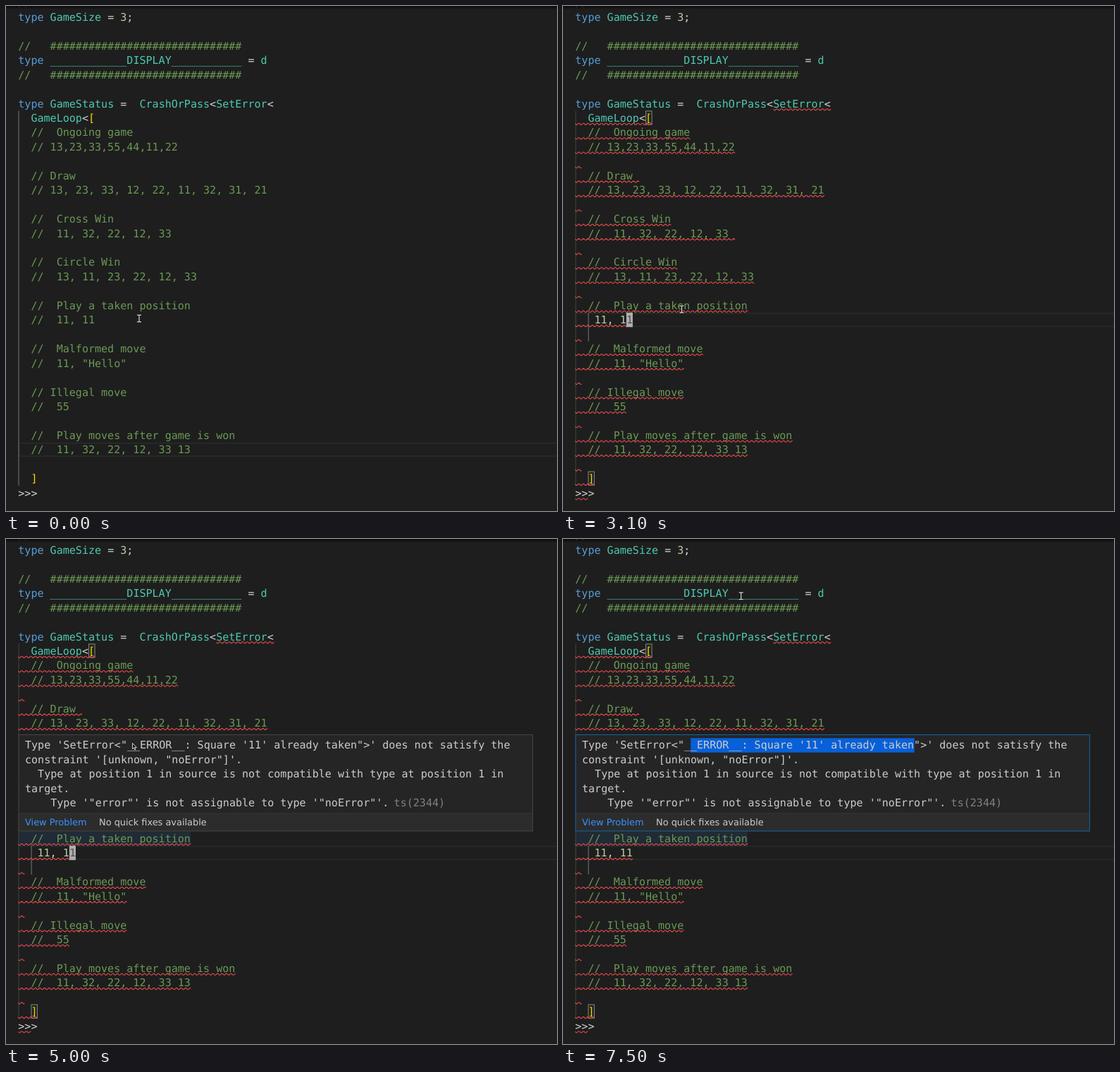
Write an HTML page that moves like this. It is 782 px wide and 716 px high and loops after 8 s.

```html
<!DOCTYPE html>
<html lang="en">
<head>
<meta charset="utf-8">
<title>Type checked game</title>
<style>
html, body { margin: 0; width: 100%; height: 100%; overflow: hidden; background: #1e1e1e; }
svg { display: block; }
text { font: 15.069px "DejaVu Sans Mono", monospace; white-space: pre; text-rendering: geometricPrecision; fill: #d4d4d4; }
.key { fill: #569cd6; }
.type { fill: #4ec9b0; }
.num { fill: #b5cea8; }
.note { fill: #6a9955; }
.brace { fill: #ffd700; }
.tip { fill: #cccccc; }
.code { fill: #cccccc; opacity: .55; }
.ui { font: 12.916px "DejaVu Sans", sans-serif; fill: #cccccc; }
.link { fill: #3794ff; }
</style>
</head>
<body>
<script>
const W = 782, H = 716, LOOP = 8000;
const X0 = 17.3, TOP = 5.31, CW = 9.072, LH = 20.45, ZOOM = 1.0763;
const TIP_X = 27, TIP_Y = 277, TIP_H = 137.5, TIP_BASE = 297.4, SEL = 17;

const hashes = "//   " + "#".repeat(30);
const lines = [
  "type GameSize = 3;", "", hashes,
  "type " + "_".repeat(12) + "DISPLAY" + "_".repeat(11) + " = d", hashes, "",
  "type GameStatus =  CrashOrPass<SetError<",
  "  GameLoop<[",
  "  //  Ongoing game", "  // 13,23,33,55,44,11,22", "",
  "  // Draw ", "  // 13, 23, 33, 12, 22, 11, 32, 31, 21", "",
  "  //  Cross Win", "  //  11, 32, 22, 12, 33 ", "",
  "  //  Circle Win", "  //  13, 11, 23, 22, 12, 33", "",
  "  //  Play a taken position", "  //  11, 11", "",
  "  //  Malformed move", "  //  11, \"Hello\"", "",
  "  // Illegal move", "  //  55", "",
  "  //  Play moves after game is won", "  //  11, 32, 22, 12, 33 13", "",
  "  ]", ">>>"
];
const EDIT = 21, LIVE = "   11, 11";
const message = [
  "Type 'SetError<\"__ERROR__: Square '11' already taken\">' does not satisfy the",
  "constraint '[unknown, \"noError\"]'.",
  "  Type at position 1 in source is not compatible with type at position 1 in",
  "target.",
  "    Type '\"error\"' is not assignable to type '\"noError\"'."
];

const colX = c => X0 + c * CW;
const rowY = r => TOP + r * LH;

function add(parent, tag, attrs = {}, content) {
  const el = document.createElementNS("http://www.w3.org/2000/svg", tag);
  for (const k in attrs) el.setAttribute(k, attrs[k]);
  if (content !== undefined) el.textContent = content;
  parent.appendChild(el);
  return el;
}
const group = parent => add(parent, "g");
const rect = (parent, x, y, width, height, fill, more) =>
  add(parent, "rect", { x, y, width, height, fill, ...more });
const label = (parent, x, y, cls, s) =>
  add(parent, "text", { x, y, class: cls, "xml:space": "preserve" }, s);
const show = (el, on) => el.setAttribute("visibility", on ? "visible" : "hidden");
const move = (el, x, y) => el.setAttribute("transform", `translate(${x} ${y})`);

function kind(s) {
  if (s === "type") return "key";
  if (/^\d/.test(s)) return "num";
  if (/^\w/.test(s)) return "type";
  return /[[\]]/.test(s) ? "brace" : "";
}
function codeLine(parent, row, s) {
  const y = rowY(row) + 15.5;
  if (s.trim().startsWith("//")) return label(parent, X0, y, "note", s);
  const el = label(parent, X0, y, "");
  for (const part of s.match(/\w+|[[\]]|[^\w[\]]+/g) || [])
    add(el, "tspan", { class: kind(part) }, part);
  return el;
}
// zigzag with a period of 6 and a height of 3, cut off at the box
function squiggle(parent, row, from, to) {
  const width = (to - from) * CW, units = width / ZOOM;
  const box = add(parent, "svg", {
    x: colX(from), y: rowY(row + 1) - 3 * ZOOM, width, height: 3 * ZOOM,
    viewBox: `0 0 ${units} 3`, overflow: "hidden"
  });
  let d = "M-1.25 0";
  for (let x = 1.75; x < units + 6; x += 6) d += `L${x} 3L${x + 3} 0`;
  add(box, "path", { d, fill: "none", stroke: "#f14c4c" });
}

const svg = add(document.body, "svg", { width: W, height: H, viewBox: `0 0 ${W} ${H}` });
const defs = add(svg, "defs");
const shade = add(defs, "linearGradient", { id: "shade", x1: 0, y1: 0, x2: 0, y2: 1 });
add(shade, "stop", { offset: 0, "stop-color": "#000", "stop-opacity": .7 });
add(shade, "stop", { offset: 1, "stop-color": "#000", "stop-opacity": 0 });

rect(svg, 0, 0, W, H, "#1e1e1e");
const current = rect(svg, X0 + 1, 1, W, LH - 2, "none", { stroke: "#282828", "stroke-width": 2 });
const hover = rect(svg, X0, rowY(20), 27 * CW, LH, "#264f78", { opacity: .25 });
const guide = rect(svg, 17.5, rowY(7), 1.1, 26 * LH, "#707070");
const inner = rect(svg, 35.6, rowY(EDIT), 1.1, 2 * LH, "#707070");

const match = group(svg);
for (const [row, col] of [[7, 11], [32, 2]])
  rect(match, colX(col) + .5, rowY(row) + .5, CW - .6, LH - 1.4, "#1c251c", { stroke: "#888" });

codeLine(svg, -1, "//");
lines.forEach((s, r) => r !== EDIT && codeLine(svg, r, s));
const before = codeLine(svg, EDIT, lines[EDIT]);
const after = codeLine(svg, EDIT, LIVE);

const errors = group(svg);
squiggle(errors, 6, 31, 40);
for (let r = 7; r < 34; r++) {
  const s = r === EDIT ? LIVE : lines[r];
  squiggle(errors, r, 0, r === 33 ? 2 : Math.max(1, s.length));
}

const caret = group(svg);
rect(caret, 0, 0, CW, LH, "#aeafad");
const under = label(caret, 0, 15.5, "", "1");
under.style.fill = "#515052";

rect(svg, 0, 0, W, 5, "url(#shade)");

const tip = group(svg);
rect(tip, 17.5, TIP_Y, 730.5, TIP_H, "#252526");
rect(tip, 18, 388.5, 730, 26, "#2c2c2d");
rect(tip, 18, 388.5, 730, 1, "#353536");
const edge = rect(tip, 18, TIP_Y + .5, 729.5, TIP_H - 1, "none", { stroke: "#454545" });
const picked = rect(tip, TIP_X + SEL * CW, 282.3, 0, LH, "#0860d8");
message.forEach((s, i) => label(tip, TIP_X, TIP_BASE + i * LH, "tip", s));
label(tip, 550.6, TIP_BASE + 4 * LH, "code", "ts(2344)");
label(tip, 27, 405.5, "ui link", "View Problem");
label(tip, 132, 405.5, "ui", "No quick fixes available");

const beam = group(svg);
const beamPath = "M-3 -4.9H-1L0 -4.2L1 -4.9H3M0 -4.2V4.2M-3 4.9H-1L0 4.2L1 4.9H3";
add(beam, "path", { d: beamPath, fill: "none", stroke: "#111", "stroke-width": 2.6 });
add(beam, "path", { d: beamPath, fill: "none", stroke: "#e4e4e4", "stroke-width": 1.2 });
const arrow = group(svg);
add(arrow, "path", {
  d: "M.5 .5V8.6L2.4 6.9L3.8 10L5 9.4L3.7 6.5H6.4Z",
  fill: "#161616", stroke: "#e4e4e4", "stroke-width": .9
});

// time, x, y
const path = [
  [2700, 189, 443], [3100, 168.5, 430], [3700, 168.5, 430], [4100, 215, 375],
  [4400, 251, 312], [4600, 235, 291], [5000, 179, 289], [5100, 179, 289],
  [6000, 459.5, 296], [6400, 501.5, 295], [6500, 501.5, 295],
  [7400, 252.7, 87], [7500, 252.7, 80.7]
];
function mouseAt(t) {
  const i = path.findIndex(p => p[0] > t);
  if (i === 0) return path[0].slice(1);
  if (i < 0) return path[path.length - 1].slice(1);
  const [a, x, y] = path[i - 1], [b, u, v] = path[i];
  const k = (t - a) / (b - a);
  return [x + (u - x) * k, y + (v - y) * k];
}

// caret toggles: on, off, on, off ...
const blinks = [400, 900, 1400, 2200, 2800, 3300, 3800, 4300, 4800, 5300];

function draw(time) {
  const t = Math.floor(time / 100) * 100;
  const clicked = t >= 400, edited = t >= 1700, hovered = t >= 3300;

  current.setAttribute("y", rowY(clicked ? EDIT : 30) + 1);
  show(match, clicked);
  show(before, !edited);
  show(after, edited);
  show(inner, edited);
  guide.setAttribute("fill", edited ? "#404040" : "#707070");
  show(errors, t >= 2100);
  show(hover, hovered);

  const col = edited ? 8 : t < 500 ? 12 : 11;
  move(caret, colX(col), rowY(EDIT));
  const lit = blinks.filter(b => b <= t).length % 2 === 1;
  show(caret, lit);
  show(under, lit && col !== 12);

  tip.setAttribute("opacity", !hovered ? 0 : t < 3400 ? .3 : t < 3500 ? .84 : 1);
  edge.setAttribute("stroke", t >= 6600 ? "#0e66a3" : "#454545");

  const [x, y] = mouseAt(t);
  const end = t < 5200 ? SEL : Math.floor((mouseAt(Math.min(t, 6400))[0] - TIP_X) / CW);
  picked.setAttribute("width", Math.max(0, end - SEL) * CW);

  const inTip = hovered && y > TIP_Y && y < TIP_Y + TIP_H;
  show(beam, !inTip);
  show(arrow, inTip);
  move(inTip ? arrow : beam, x, y);
}

const start = performance.now();
function tick() {
  draw((performance.now() - start) % LOOP);
  requestAnimationFrame(tick);
}
tick();
</script>
</body>
</html>
```
